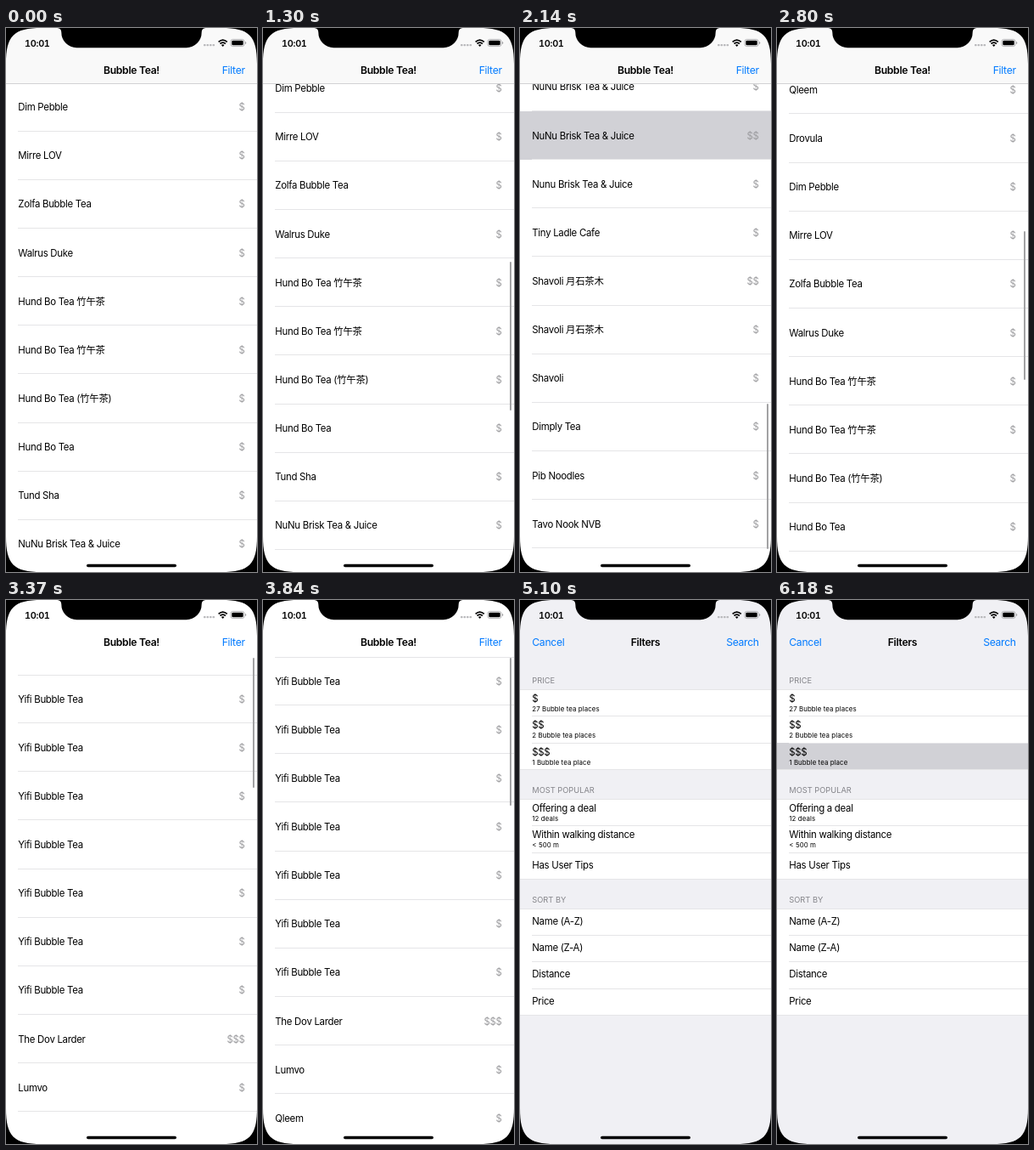
An HTML page for the animation above (8000 ms loop, 296 by 640 pixels).

```html
<!DOCTYPE html>
<html lang="en">
<head>
<meta charset="utf-8">
<title>Bubble Tea!</title>
<style>
  html, body { margin: 0; width: 100%; height: 100%; overflow: hidden; background: #000; }
  #stage {
    position: relative; width: 296px; height: 640px; overflow: hidden; background: #fff;
    font: 11.43px Inter, "Noto Sans CJK SC", "Noto Sans CJK", sans-serif;
    letter-spacing: -.026em; color: #000; white-space: nowrap;
  }
  #stage div, #stage svg { position: absolute; }
  #view { left: 0; top: 66px; width: 296px; height: 550px; overflow: hidden; }
  #list { left: 0; top: 0; width: 296px; }
  .row { left: 0; width: 296px; }
  .row span { position: absolute; left: 14.3px; top: .6px; }
  .row .price { left: auto; right: 14.5px; color: #9c9c9f; }
  .line { right: 0; height: 1px; background: #e5e5e7; }
  .pressed { background: #d1d1d6; }
  .bar { left: 0; top: 0; width: 296px; height: 66px; font-size: 12.15px; }
  .bar span { position: absolute; top: 40px; line-height: 20px; color: #007aff; }
  .bar .title { left: 0; width: 100%; text-align: center; font-weight: 600; color: #000; }
  .left { left: 14.3px; }
  .right { right: 14.3px; }
  #bar { box-sizing: border-box; border-bottom: 1px solid transparent; }
  #bar.raised { background: #f9f9f9; border-color: #d2d2d4; }
  #thumb { left: 291px; width: 2px; border-radius: 1px; background: #a2a2a4; }
  #modal { left: 0; top: 0; width: 296px; height: 640px; background: #f0f0f4; }
  .head { left: 14.3px; font-size: 9.29px; line-height: 12px; letter-spacing: 0; color: #85858a; }
  .cell { left: 0; width: 296px; background: #fff; }
  .cell.pressed { background: #d1d1d6; }
  .cell span { position: absolute; left: 14.3px; }
  .cell .note { top: 18px; font-size: 7.86px; line-height: 11px; letter-spacing: .011em; }
  #clock {
    left: 22px; top: 10px; font-size: 10.9px; line-height: 16px; font-weight: 600;
    font-variant-numeric: tabular-nums;
  }
  #frame { left: 0; top: 0; }
</style>
</head>
<body>
<div id="stage">
  <div id="view"><div id="list"></div></div>
  <div id="bar" class="bar">
    <span class="title">Bubble Tea!</span><span class="right" id="filter">Filter</span>
  </div>
  <div id="thumb"></div>
  <div id="modal">
    <div class="bar">
      <span class="title">Filters</span><span class="left">Cancel</span><span class="right">Search</span>
    </div>
  </div>
  <div id="clock">10:01</div>
  <svg id="frame" width="296" height="640" viewBox="0 0 296 640">
    <g fill="#b9b9bc">
      <rect x="233" y="19" width="2.6" height="2.2" rx=".8"/>
      <rect x="236.5" y="19" width="2.6" height="2.2" rx=".8"/>
      <rect x="240" y="19" width="2.6" height="2.2" rx=".8"/>
      <rect x="243.5" y="19" width="2.6" height="2.2" rx=".8"/>
    </g>
    <g fill="none" stroke="#000" stroke-width="1.7">
      <path d="M250.6 16.4Q255.7 11.8 260.8 16.4"/>
      <path d="M252.5 18.5Q255.7 15.6 258.9 18.5"/>
    </g>
    <path d="M253.9 20Q255.7 18.5 257.5 20L255.7 21.9Z"/>
    <rect x="265" y="13.4" width="16" height="8.2" rx="2.4" fill="none" stroke="#a4a4a6" stroke-width=".8"/>
    <rect x="266.3" y="14.7" width="13.4" height="5.6" rx="1.3"/>
    <path d="M282 16.1Q283.3 16.4 283.3 17.5T282 18.9Z" fill="#a4a4a6"/>
    <rect x="95" y="630.7" width="106" height="3.6" rx="1.8"/>
    <path fill-rule="evenodd" d="M0 0H296V640H0Z M42 0H254C287 0 296 9 296 42V598C296 631 287 640 254 640H42C9 640 0 631 0 598V42C0 9 9 0 42 0Z"/>
    <path d="M60.5 0Q65.3 .3 65.3 5A18 18 0 0 0 83.3 23.2H212.7A18 18 0 0 0 230.7 5Q230.7 .3 235.5 0Z"/>
  </svg>
</div>
<script>
const LOOP = 8000, PITCH = 57.143, MAX = 1164.4, CELL = 31.43;
const $ = id => document.getElementById(id);

function add(parent, tag, cls, css, text = "") {
  const el = document.createElement(tag);
  el.className = cls;
  Object.assign(el.style, css);
  el.textContent = text;
  parent.append(el);
  return el;
}
const px = n => n + "px";
const line = (parent, y, left) => add(parent, "div", "line", { top: px(Math.round(y)), left: px(left) });

// Shop list: [name, price level, repeats]
const shops = [
  ["Yifi Bubble Tea", 1, 7], ["The Dov Larder", 3, 1], ["Lumvo", 1, 1], ["Qleem", 1, 1],
  ["Drovula", 1, 1], ["Dim Pebble", 1, 1], ["Mirre LOV", 1, 1], ["Zolfa Bubble Tea", 1, 1],
  ["Walrus Duke", 1, 1], ["Hund Bo Tea 竹午茶", 1, 2], ["Hund Bo Tea (竹午茶)", 1, 1],
  ["Hund Bo Tea", 1, 1], ["Tund Sha", 1, 1], ["NuNu Brisk Tea & Juice", 1, 1],
  ["NuNu Brisk Tea & Juice", 2, 1], ["Nunu Brisk Tea & Juice", 1, 1], ["Tiny Ladle Cafe", 1, 1],
  ["Shavoli 月石茶木", 2, 1], ["Shavoli 月石茶木", 1, 1], ["Shavoli", 1, 1],
  ["Dimply Tea", 1, 1], ["Pib Noodles", 1, 1], ["Tavo Nook NVB", 1, 1]
];
const rows = [];
line($("list"), 0, 14.3);
for (const [name, level, count] of shops) {
  for (let k = 0; k < count; k++) {
    const y = rows.length * PITCH;
    const row = add($("list"), "div", "row", { top: px(y), height: px(PITCH), lineHeight: px(PITCH) });
    add(row, "span", "", {}, name);
    add(row, "span", "price", {}, "$".repeat(level));
    line($("list"), y + PITCH - 1, 14.3);
    rows.push(row);
  }
}

// Filter sheet: [heading, top of the cells, [label, note]...]
const sections = [
  ["PRICE", 105, ["$", "27 Bubble tea places"], ["$$", "2 Bubble tea places"], ["$$$", "1 Bubble tea place"]],
  ["MOST POPULAR", 234, ["Offering a deal", "12 deals"], ["Within walking distance", "< 500 m"], ["Has User Tips"]],
  ["SORT BY", 362.5, ["Name (A-Z)"], ["Name (Z-A)"], ["Distance"], ["Price"]]
];
const cells = [];
for (const [head, top, ...items] of sections) {
  add($("modal"), "div", "head", { top: px(top - 16) }, head);
  items.forEach(([label, note], i) => {
    const y = top + i * CELL;
    const cell = add($("modal"), "div", "cell", { top: px(y), height: px(CELL) });
    add(cell, "span", "", { lineHeight: px(note ? 23 : CELL) }, label);
    if (note) add(cell, "span", "note", {}, note);
    cells.push(cell);
  });
  items.forEach((_, i) => line($("modal"), top + i * CELL, i ? 14.3 : 0));
  line($("modal"), top + items.length * CELL, 0);
}

// The screen refreshes only at these moments.
const ticks = [
  0, 1300, 1410, 1510, 1610, 1720, 1820, 1930, 2040, 2140, 2260, 2370, 2480, 2590, 2690, 2800,
  2920, 3040, 3150, 3260, 3370, 3490, 3610, 3720, 3840, 3960, 4080, 4490, 4650, 4760, 4870, 4990, 5100, 6180
];
// Finger drags: [time, offset]
const dragUp = [[1300, 652], [1410, 795], [1510, 953], [1610, 1098.7], [1675, MAX]];
const dragDown = [[2140, 1168], [2260, 1163], [2370, 1132], [2480, 1058], [2590, 926], [2690, 738], [2800, 536.4]];

function along(path, t) {
  const i = path.findIndex(p => p[0] >= t);
  if (i < 1) return path[0][1];
  const [a, x] = path[i - 1], [b, y] = path[i];
  return x + (y - x) * (t - a) / (b - a);
}
// Overshoot past an edge, critically damped
const bounce = (ms, speed) => speed * ms / 1000 * Math.exp(-0.011 * ms);

function scrollAt(t) {
  if (t < 1300) return 630;
  if (t <= 1675) return along(dragUp, t);
  if (t < 2140) return MAX + bounce(t - 1675, 950);
  if (t <= 2800) return along(dragDown, t);
  if (t < 3300) return 536.4 - 848 * (1 - Math.exp((2800 - t) / 500));
  return t < 4400 ? -bounce(t - 3300, 680) : 0;
}
function sheetAt(t) {
  const u = (t - 4610) * 0.018;
  return t < 4650 ? 640 : t < 5100 ? 640 * (1 + u) * Math.exp(-u) : 0;
}

function draw(time) {
  const t = ticks.filter(x => x <= time).pop();
  const s = scrollAt(t);
  const over = Math.max(0, -s, s - MAX);
  const inside = Math.min(MAX, Math.max(0, s));
  const size = 175 - over;
  $("list").style.transform = `translateY(${-Math.round(s)}px)`;
  $("bar").classList.toggle("raised", s > 0.5);
  $("thumb").style.display = t < 1300 ? "none" : "block";
  $("thumb").style.height = px(size);
  $("thumb").style.top = px(s > MAX ? 613.5 - size : 68 + inside / MAX * 370.5);
  $("filter").style.opacity = t === 4490 ? 0.18 : 1;
  rows[21].classList.toggle("pressed", t === 2140);
  cells[2].classList.toggle("pressed", t >= 6180);
  const y = Math.round(sheetAt(t));
  $("modal").style.display = y < 640 ? "block" : "none";
  $("modal").style.transform = `translateY(${y}px)`;
}

const start = performance.now();
function loop() {
  draw((performance.now() - start) % LOOP);
  requestAnimationFrame(loop);
}
loop();
</script>
</body>
</html>
```
